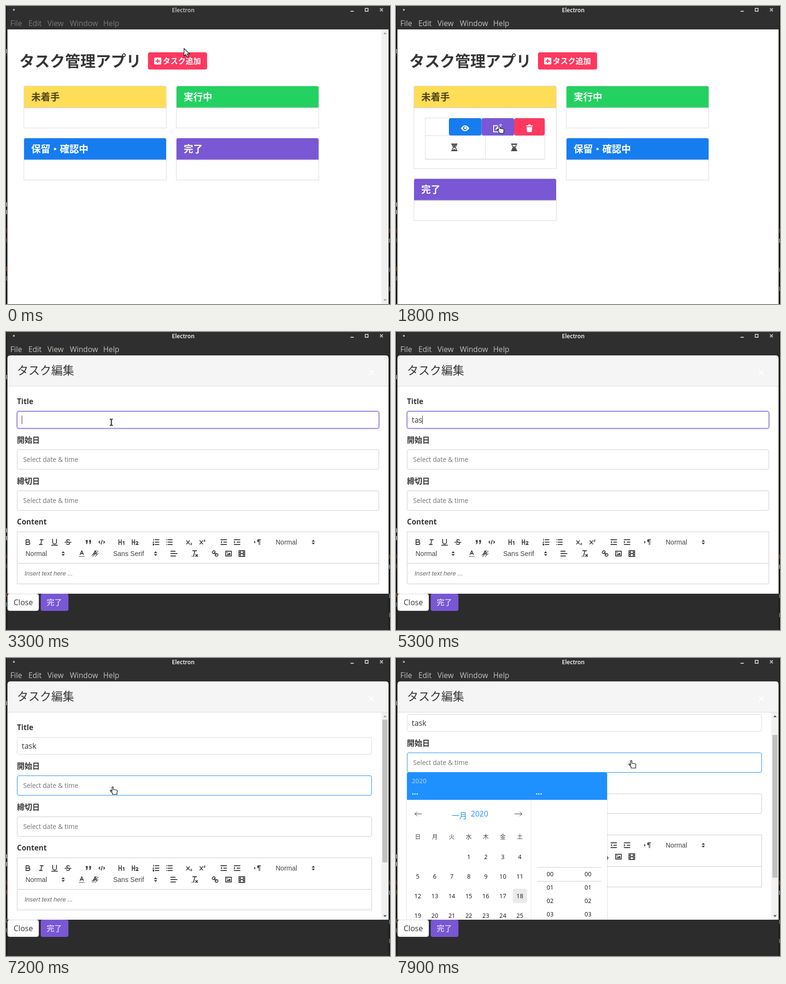
An HTML page that plays this animation: 806 by 624 pixels, repeating every 8000 ms.

```html
<!DOCTYPE html>
<html lang="ja">
<head>
<meta charset="utf-8">
<style>
  html, body { margin: 0; width: 100%; height: 100%; overflow: hidden; background: #2f2f2f; }
  svg { display: block; }
  text { font-family: "Open Sans", "Noto Sans CJK JP", "Noto Sans CJK", sans-serif; font-size: 16px; fill: #363636; white-space: pre; }
  .ja { font-family: "Noto Sans CJK JP", "Noto Sans CJK", sans-serif; }
  .quill { font-family: "Liberation Sans", sans-serif; font-size: 14px; fill: #444; }
  .b { font-weight: 700; }
  .w { fill: #fff; }
  .mid { text-anchor: middle; }
  .hint { font-size: 13.7px; fill: #757575; }
  .box { fill: #fff; stroke: #ccc; }
  .line { fill: none; stroke: #dbdbdb; }
</style>
</head>
<body>
<svg id="stage" width="806" height="624"></svg>
<script>
const rect = (x, y, w, h, fill, r = 0, more = '') =>
  `<rect x="${x}" y="${y}" width="${w}" height="${h}" rx="${r}" fill="${fill}" ${more}/>`;
const text = (x, y, s, cls = '', more = '') => `<text x="${x}" y="${y}" class="${cls}" ${more}>${s}</text>`;
const path = (d, fill, stroke = 'none', width = 1, more = '') =>
  `<path d="${d}" fill="${fill}" stroke="${stroke}" stroke-width="${width}" ${more}/>`;
const at = (x, y, content, id = '') => `<g ${id && `id="${id}"`} transform="translate(${x} ${y})">${content}</g>`;
const view = (x, y, w, h, content) =>
  `<svg x="${x}" y="${y}" width="${w}" height="${h}" viewBox="${x} ${y} ${w} ${h}">${content}</svg>`;
const range = n => [...Array(n).keys()];

// ---------- window frame ----------
const specks = [[0, 90, '#999'], [0, 411, '#aaa'], [0, 427, '#aaa'], [0, 466, '#5c2b1e'], [0, 486, '#70401f'],
  [0, 546, '#70401f'], [0, 566, '#666'], [804, 466, '#70401f'], [804, 487, '#888'], [804, 548, '#666'], [804, 588, '#666']];
const frame = rect(0, 0, 806, 624, '#1c1c1c') +
  specks.map(([x, y, c]) => rect(x, y, 2, 9, c)).join('') +
  rect(2, 0, 802, 49, '#2f2f2f') +
  '<circle cx="16.5" cy="8" r="2" fill="#bbb"/>' +
  text(372, 13, 'Electron', 'mid', 'id="caption" style="font-size:12px;font-weight:600"') +
  path('M723 11h7M754 5h6v6h-6zM785 5l6 6m0-6l-6 6', 'none', '#c4c4c4', 1.8) +
  '<g id="menu">' + [[9, 'File'], [47, 'Edit'], [87, 'View'], [134, 'Window'], [204, 'Help']]
    .map(([x, s]) => text(x, 42, s, '', 'style="font-size:15.7px;fill:inherit"')).join('') + '</g>' +
  rect(3, 49, 800, 575, '#fff');

// ---------- board ----------
const card = (id, x, y, color, title, ink = '#fff') => at(x, y,
  rect(.5, 46.5, 299, 42, '#fff', 0, `class="line" ${id === 'todo' ? 'id="todoBody"' : ''} style="fill:#fff"`) +
  path('M.5 46V4q0-3.500 3.500-3.500h292q3.500 0 3.500 3.500V46z', color, '#dbdbdb') +
  text(16, 30.500, title, 'ja b', `style="font-size:20px;fill:${ink}"`), id);

const hourglass = (x, sand) => at(x, 288,
  path('M0 0h13v2H0zM0 14h13v2H0z', '#4a4a4a') +
  path('M2 2Q2 6 5.500 8Q2 10 2 14H11Q11 10 7.500 8Q11 6 11 2z', 'none', '#4a4a4a', 1.6) + path(sand, '#4a4a4a'));

const task = '<g id="task">' +
  rect(61, 235, 252, 87, '#0001', 1) + rect(61.5, 234.5, 251, 86, '#fff', 0, 'class="line" style="fill:#fff"') +
  path('M61 271.500h252M187.500 271v49', 'none', '#dbdbdb') +
  rect(111, 235, 68.5, 36, '#167df0', 4) + rect(179.5, 235, 68.5, 36, '#7957d5', 4) + rect(248, 235, 64, 36, '#ff3860', 4) +
  path('M136 256q9-12 18 0q-9 12-18 0z', '#fff') + '<circle cx="145" cy="256" r="4" fill="#167df0"/><circle cx="145.500" cy="255.500" r="2.500" fill="#fff"/>' +
  path('M213 250.500h-8v13h12v-5', 'none', '#fff', 2) + path('M209 260l.5-4 8-8 3.500 3.500-8 8zM218.500 247l1-.8 3 3-.9 1z', '#fff') +
  path('M273 250h4l1-2h4l1 2h4v2h-14zM274 253.500h12l-1 9.500q0 1-1 1h-8q-1 0-1-1z', '#fff') +
  hourglass(116, 'M3 3h7L6.500 8zM3 14l3.500-3 3.500 3z') + hourglass(241.500, 'M2.500 14Q3 10 6.500 8.500Q10 10 10.500 14zM4 6h5L6.500 8z') + '</g>';

const board = text(28, 127, 'タスク管理アプリ', 'ja b', 'style="font-size:32px"') +
  rect(298, 97, 124, 36, '#ff3860', 4, 'id="add"') + rect(311, 108, 15, 14.5, '#fff', 2) +
  path('M318.500 111v8.500M314 115.300h9', 'none', '#ff3860', 2.4) + text(329, 121, 'タスク追加', 'ja b w') +
  card('todo', 37, 167, '#ffdd57', '未着手', '#4d421a') + card('doing', 357, 167, '#23d160', '実行中') +
  card('hold', 37, 276, '#167df0', '保留・確認中') + card('done', 357, 276, '#7957d5', '完了') + task +
  '<g id="pageBar">' + rect(788, 49, 15, 575, '#f1f1f1') + path('M792 59l3.500-4 3.500 4zM792 614l3.500 4 3.500-4z', '#a3a3a3') + '</g>';

// ---------- editor toolbar: [stroked, filled] on an 18 px grid ----------
const letterA = 'M5.500 11L9 3l3.500 8M6.400 9h5.200';
const heading = 'M3 4v10M8 4v10M3 9h5';
const icons = {
  bold: ['M5 4h4.500a2.500 2.500 0 0 1 0 5H5zM5 9h5.500a2.500 2.500 0 0 1 0 5H5z'],
  italic: ['M7 4h6M5 14h6M8 14l2-10'],
  underline: ['M5 3v6a4 4 0 0 0 8 0V3M3 15.500h12'],
  strike: ['M2.500 9.300h13M12 5C11 3 6.500 3.300 6.500 6c0 3 6 2.500 6 5.500 0 3-5.500 3-7 1'],
  quote: ['', 'M3.500 4.500h4V8q0 4-3 5.500l-.8-1.300Q5 11 5 9H3.500zM10.500 4.500h4V8q0 4-3 5.500l-.8-1.300Q12 11 12 9h-1.500z'],
  code: ['M5 7L3 9l2 2M13 7l2 2-2 2M10 5L8 13'],
  h1: [heading + 'M11.500 8.500l2-1V14'],
  h2: [heading + 'M11 9q1-2 3-1t0 3l-3 3h4.500'],
  ordered: ['M7 4h8M7 9h8M7 14h8', 'M3 2h1.300v4H3zM2 8h3l-1.500 3H2zM2 12h3v4H2z'],
  bullet: ['M6 4h9M6 9h9M6 14h9M3 4h.1M3 9h.1M3 14h.1'],
  sub: ['M3 6l6 7M9 6l-6 7', 'M11 11.500q2-2 3.500 0 0 1-2 2.500h2v1h-4q0-1 2.500-3-1-1-2 0z'],
  sup: ['M3 6l6 7M9 6l-6 7', 'M11 4.500q2-2 3.500 0 0 1-2 2.500h2v1h-4q0-1 2.500-3-1-1-2 0z'],
  outdent: ['M3 4h12M9 9h6M3 14h12', 'M5.500 6v6L2.500 9z'],
  indent: ['M3 4h12M9 9h6M3 14h12', 'M2.500 6v6l3-3z'],
  direction: ['', 'M2 6v6l3-3zM11 3h5v1.500h-1.500V15h-1V4.500h-1V15h-1V9a3 3 0 0 1-.5-6z'],
  arrows: ['', 'M5.500 8L9 4l3.500 4zM5.500 10L9 14l3.500-4z'],
  color: [letterA, 'M3 14.500h12v1H3z'],
  background: [letterA, 'M2 12l10-10h1.500L2 14zM3 15.500l13-13V4L4.500 15.500zM8 15.500l8-8V9l-6.500 6.500z'],
  align: ['M3 4h9M3 9h13M3 14h10'],
  clean: ['M5 3h8M9.500 3L7 13M11 11l4 4M15 11l-4 4', 'M2 14h7v1H2z'],
  link: ['M7 7l4 4M8.900 4.600a3.500 3.500 0 0 1-4.300 4.300C3 7.500 2 6.400 4.200 4.200S7.500 3.200 8.900 4.600zM13.400 9.100a3.500 3.500 0 0 0-4.300 4.300c1.400 1.400 2.500 2.500 4.700.4S14.800 10.500 13.400 9.100z'],
  image: ['M3 4h12v10H3z', 'M5 12v-1l2-2 1 1 3-3 2 2v3zM5 6h2v2H5z'],
  video: ['M3 3h12v12H3zM6 3v12M12 3v12M6 9h6M3 7h3M3 11h3M12 7h3M12 11h3']
};
const icon = (name, x, y) => at(x - 9, y - 9, path(icons[name][0], 'none', '#444', 1.8, 'stroke-linecap="round" stroke-linejoin="round"') +
  path(icons[name][1] || '', '#444'));
const iconRow = (y, places) => Object.entries(places).map(([name, x]) => icon(name, x, y)).join('');
const toolbar = iconRow(440, { bold: 46, italic: 74, underline: 102, strike: 130, quote: 173, code: 201, h1: 243, h2: 271,
    ordered: 315, bullet: 343, sub: 385, sup: 413, outdent: 457, indent: 485, direction: 528, arrows: 645 }) +
  iconRow(464, { arrows: 120, color: 159, background: 187, align: 352, clean: 396, link: 439, image: 467, video: 495 }) +
  icon('arrows', 314, 464) + text(566, 445, 'Normal', 'quill') + text(41, 469, 'Normal', 'quill') + text(225, 469, 'Sans Serif', 'quill');

// ---------- date picker ----------
const blue = '#1e90ff';
const column = i => 45.700 + 35.700 * i;
const small = 'style="font-size:12.5px;fill:#111"';
const picker = '<g id="picker">' + rect(21, 288, 424, 400, '#0001', 4) + rect(23, 287, 420, 400, '#fff', 4) +
  path('M23 345v-54q0-4 4-4h412q4 0 4 4v54z', blue) +
  text(33, 310, '2020', '', 'style="font-size:13.5px;fill:#ffffffb3"') +
  text(33, 334, '...', 'b w') + text(293, 334, '...', 'b w') + rect(283, 345, 1, 340, '#eaeaea') +
  path('M54 374.500H39.500m5-4.500l-5 4.500 5 4.500M249 374.500h15.500m-5-4.500l5 4.500-5 4.500', 'none', '#2c3e50') +
  text(117, 384, '一月', 'ja', `style="fill:${blue}"`) + text(157, 380, '2020', '', `style="fill:${blue}"`) +
  [...'日月火水木金土'].map((d, i) => text(column(i), 427, d, 'ja mid', 'style="font-size:12px;fill:#444"')).join('') +
  rect(245, 531, 30, 30, '#eaeaea', 4) +
  range(25).map(i => text(column((i + 3) % 7), 468.5 + 41 * Math.floor((i + 3) / 7), i + 1, 'mid', small)).join('') +
  path('M296 486.500h135M296 515.500h135', 'none', '#ccc') +
  range(4).map(i => [323.5, 403].map(x => text(x, 505 + 28 * i, '0' + i, 'mid', small)).join('')).join('') + '</g>';

// ---------- edit dialog ----------
const field = (id, y, h) => `<rect id="${id}" class="box wide" x="23.500" y="${y}" height="${h}" rx="3.500"/>`;
const label = (y, s, cls = 'ja b') => text(23, y, s, cls, cls === 'b' ? 'style="font-size:15.5px"' : '');
const form = '<g id="form">' +
  label(151, 'Title', 'b') + '<rect id="ring" class="wide" x="23.500" y="166.500" height="35" rx="4" fill="none" stroke="#7957d5" stroke-opacity=".3" stroke-width="5"/>' +
  field('titleField', 166.5, 35) + text(33, 190, '', '', 'id="typed"') + rect(33, 175, 1, 18, '#333', 0, 'id="caret"') +
  label(232, '開始日') + field('startField', 246.5, 41) + text(36, 272, 'Select date &amp; time', 'hint') +
  label(318, '締切日') + field('endField', 332.5, 41) + text(36, 358, 'Select date &amp; time', 'hint') +
  label(403, 'Content', 'b') +
  '<rect class="box wide" x="23.500" y="418.500" height="66"/><rect class="box wide" x="23.500" y="484.500" height="43"/>' + toolbar +
  text(39, 510, 'Insert text here ...', 'quill', 'style="font-size:13px;font-style:italic;fill:#666"') + picker + '</g>';
const formBar = '<g id="formBar">' + rect(788, 114, 15, 434, '#f1f1f1') + rect(790, 129, 11, 299, '#c1c1c1', 0, 'id="thumb"') +
  path('M792 124l3.500-4 3.500 4z', '#a3a3a3', 'none', 1, 'id="upArrow"') + path('M792 538.500l3.500 4 3.500-4z', '#505050') + '</g>';
const dialog = '<g id="dialog">' + rect(3, 49, 800, 575, '#0a0a0a', 0, 'opacity=".86"') + '<g id="sheet">' +
  path('M3 114V55q0-6 6-6h788q6 0 6 6v59z', '#f5f5f5') + rect(3, 114, 800, 434, '#fff') + rect(3, 113, 800, 1, '#dbdbdb') +
  text(23, 89, 'タスク編集', 'ja', 'style="font-size:24px"') + path('M762 80l10 10m0-10l-10 10', 'none', '#fff', 2) +
  view(3, 114, 800, 434, form + formBar) +
  rect(3.5, 548.5, 65, 35, '#fff', 4, 'class="line" style="fill:#fff"') + text(16, 572, 'Close') +
  rect(73, 548, 58, 36, '#7957d5', 4) + text(85.5, 572, '完了', 'ja w') + '</g></g>';

// ---------- pointer ----------
const pointer = '<g id="pointer">' +
  path('M.7 1v16l3.800-3.500 2.500 5.500 2.700-1.200-2.400-5.400h5z', '#fff', '#111', 1.2, 'id="arrow"') +
  path('M4.500 10V2q0-1.400 1.300-1.400T7.100 2v4.300l7 1.200q1.500.4 1.500 2L15 13v3.500H5.500V14L1 9.500q-.5-1.500 1-1.800z', '#fff', '#111', 1.2, 'id="hand"') +
  '<g id="beam">' + path('M1 1.500h6M4 1.500v13M1 14.500h6', 'none', '#fff', 4) + path('M1 1.500h2.500M4.500 1.500H7M4 2v12M1 14.500h2.500M4.500 14.500H7', 'none', '#111', 1.8) + '</g></g>';

stage.innerHTML = frame + view(3, 49, 800, 575, board + dialog) + pointer;

// ---------- motion ----------
const el = id => document.getElementById(id);
const show = (id, on) => el(id).style.display = on ? '' : 'none';
const attr = (id, name, value) => el(id).setAttribute(name, value);
const move = (id, x, y) => attr(id, 'transform', `translate(${x} ${y})`);
const easeOut = p => 1 - (1 - Math.min(1, Math.max(0, p))) ** 3;
const within = (t, a, b) => t >= a && t < b;

function track(t, keys, column = 1) {
  const next = keys.findIndex(k => k[0] > t);
  if (next < 0) return keys[keys.length - 1][column];
  if (next === 0) return keys[0][column];
  const a = keys[next - 1], b = keys[next];
  return a[column] + (b[column] - a[column]) * (t - a[0]) / (b[0] - a[0]);
}

const pointerKeys = [
  [0, 373, 88, 'arrow'], [100, 371, 100, 'hand'], [300, 368, 121, 'hand'], [700, 368, 121, 'hand'], [900, 335, 150, 'arrow'],
  [1200, 240, 228, 'arrow'], [1300, 227, 238, 'hand'], [1400, 210, 248, 'hand'], [1500, 210, 248, 'hand'], [1600, 211, 250, 'hand'],
  [2300, 211, 250, 'hand'], [2400, 208, 247, 'hand'], [2500, 208, 247, 'hand'], [2600, 208, 200, 'hand'], [2900, 208, 200, 'hand'],
  [3200, 217, 181, 'beam'], [3500, 217, 181, 'beam'], [3600, 218, 166, 'beam'], [3700, 218, 166, 'none'],
  [6200, 216, 148, 'arrow'], [6600, 187, 219, 'arrow'], [6900, 212, 262, 'hand'], [7000, 218, 269, 'hand'],
  [7500, 218, 269, 'hand'], [7800, 488, 214, 'hand']];
const typing = [[0, ''], [4600, 'ta'], [5300, 'tas'], [5600, 'task']];
const carets = [[3300, 4000, 33], [5300, 5400, 55], [6200, 6500, 63]];

function render(t) {
  const active = t >= 500;
  attr('caption', 'style', `font-size:12px;font-weight:600;fill:${active ? '#fff' : '#c8c8c8'}`);
  attr('menu', 'fill', active ? '#c4c0bb' : '#7d7a77');
  attr('add', 'fill', within(t, 100, 900) ? '#ff2b56' : '#ff3860');

  show('task', active);
  attr('todoBody', 'height', active ? 127 : 42);
  const swap = easeOut((t - 475) / 300);
  move('hold', 37 + 320 * swap, 276);
  move('done', 357 - 320 * swap, 276 + 85 * swap);
  show('pageBar', t < 1800);

  const open = track(t, [[1800, 0], [2000, .5], [2900, .5], [3200, 1]]);
  const zoom = 1.1 - .1 * open;
  show('dialog', open > 0);
  attr('dialog', 'opacity', open);
  attr('sheet', 'transform', `translate(403 336) scale(${zoom}) translate(-403 -336)`);

  const picking = t >= 7200, focused = within(t, 3300, 7200);
  document.querySelectorAll('.wide').forEach(r => r.setAttribute('width', picking ? 744 : 759));
  show('ring', focused);
  el('titleField').style.stroke = focused ? '#7957d5' : '#dbdbdb';
  el('startField').style.stroke = picking ? blue : '#ccc';
  el('typed').textContent = typing.filter(k => k[0] <= t).pop()[1];
  const caret = carets.find(c => within(t, c[0], c[1]));
  show('caret', caret);
  if (caret) attr('caret', 'x', caret[2]);

  const scroll = track(t, [[7500, 0], [7700, 48]]);
  const drop = easeOut((t - 7200) / 400);
  move('form', 0, -scroll);
  show('picker', picking);
  attr('picker', 'opacity', drop);
  move('picker', 0, -20 * (1 - drop));
  show('formBar', picking);
  attr('thumb', 'y', 129 + scroll * 2 / 3);
  attr('upArrow', 'fill', scroll ? '#505050' : '#a3a3a3');

  const shape = pointerKeys.filter(k => k[0] <= t).pop()[3];
  for (const id of ['arrow', 'hand', 'beam']) show(id, id === shape);
  move('pointer', track(t, pointerKeys), track(t, pointerKeys, 2));
}

function tick() {
  render(Math.floor(performance.now() % 8000 / 100) * 100);
  requestAnimationFrame(tick);
}
tick();
</script>
</body>
</html>
```
